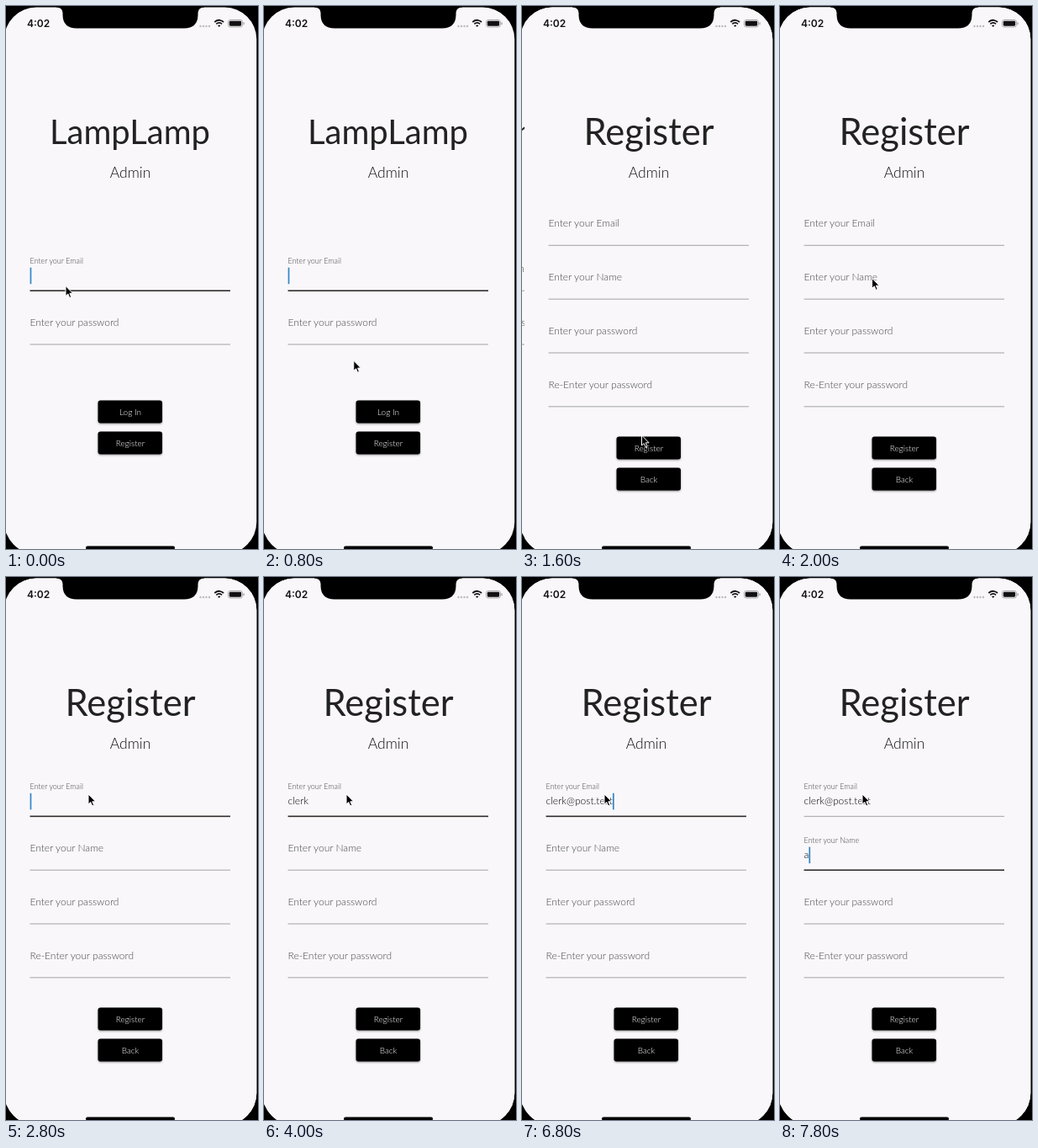
Animation of 300 by 645 pixels, one loop 8000 ms. Source, as an HTML page:

```html
<!DOCTYPE html>
<html lang="en">
<head>
<meta charset="utf-8">
<title>Register screen</title>
<style>
  html, body { margin: 0; width: 100%; height: 100%; overflow: hidden; background: #000; }
  svg { display: block; width: 100vw; height: 100vh; }
  text { font-family: Lato, "Open Sans", sans-serif; font-weight: 300; fill: #222; }
  .title, .subtitle { text-anchor: middle; }
  .title { font-weight: 400; }
  .subtitle { font-size: 17.5px; fill: #111; }
  .label { fill: #444; }
  .input { font-size: 12px; fill: #000; white-space: pre; }
  .paper { fill: #f9f7fa; }
  .button rect { filter: drop-shadow(0 1.5px 1.2px rgba(0, 0, 0, .4)); }
  .button.pressed rect { fill: #1a1a1a; filter: drop-shadow(0 4px 3.5px rgba(0, 0, 0, .45)); }
  .button text { font-size: 10px; fill: #fff; text-anchor: middle; }
  .clock { font: 600 12px Inter, sans-serif; fill: #111; }
</style>
</head>
<body>
<svg viewBox="0 0 300 645" preserveAspectRatio="none">
  <defs>
    <clipPath id="screen"><rect x="-2" y="1.5" width="300.3" height="649.5" rx="38"/></clipPath>
    <clipPath id="pressArea"><rect x="109.5" y="505.5" width="76.5" height="27" rx="3"/></clipPath>
  </defs>
  <rect width="300" height="645"/>
  <g clip-path="url(#screen)">
    <rect class="paper" width="300" height="645"/>
    <g id="login">
      <text class="title" x="147.5" y="164" font-size="40">LampLamp</text>
      <text class="subtitle" x="148" y="204">Admin</text>
    </g>
    <g id="register">
      <rect class="paper" width="300" height="645"/>
      <text class="title" x="148" y="164.5" font-size="43.5">Register</text>
      <text class="subtitle" x="148" y="204">Admin</text>
    </g>
    <rect x="95" y="641.5" width="106" height="4" rx="2"/>
  </g>
  <path d="M60 0V1.5Q67 1.5 67.5 8V11Q68 26.500 84 26.500H212Q228 26.500 228.500 11V8Q229 1.500 236 1.500V0Z"/>
  <text class="clock" x="25" y="25">4:02</text>
  <g fill="#bbb">
    <circle cx="231.5" cy="24" r="1.2"/><circle cx="235" cy="24" r="1.2"/>
    <circle cx="238.5" cy="24" r="1.2"/><circle cx="242" cy="24" r="1.2"/>
  </g>
  <g fill="none" stroke="#111" stroke-width="1.7">
    <path d="M248.3 19Q253.7 14.5 259.1 19M250.3 21.3Q253.7 18.5 257.1 21.3"/>
    <path d="M252 23L253.7 25L255.4 23Q253.7 21.8 252 23Z" fill="#111" stroke="none"/>
  </g>
  <rect x="264.5" y="16.5" width="17" height="8.5" rx="2.5" fill="none" stroke="#999" stroke-width=".8"/>
  <rect x="265.8" y="17.8" width="14.4" height="5.9" rx="1.4" fill="#111"/>
  <rect x="282.5" y="19.3" width="1.2" height="3" rx=".6" fill="#999"/>
  <path id="pointer" d="M0 0V12L2.8 9.5L4.7 14L6.7 13.1L4.8 8.8H8.6Z"
        stroke="#fff" stroke-width="1" stroke-linejoin="round"/>
</svg>
<script>
const STEP = 200, LOOP = 8000;
const $ = id => document.getElementById(id);
const login = $("login"), register = $("register"), pointer = $("pointer");

function add(parent, tag, attrs, text = "") {
  const el = document.createElementNS("http://www.w3.org/2000/svg", tag);
  for (const key in attrs) el.setAttribute(key, attrs[key]);
  el.textContent = text;
  return parent.appendChild(el);
}

// A text field placed by its underline; returns a function that sets its state.
function field(page, y, caption) {
  const label = add(page, "text", { class: "label", x: 28.5 }, caption);
  const input = add(page, "text", { class: "input", x: 28.5, y: y - 14.5 });
  const line = add(page, "rect", { x: 28.5, width: 238.5 });
  const caret = add(page, "rect", { y: y - 27.5, width: 1.7, height: 19.5, fill: "#2f86c8" });
  return ({ float = 0, focus = false, value = "", blink = false } = {}) => {
    label.setAttribute("font-size", 12 - 3 * float);
    label.setAttribute("y", y - 22 - 10.5 * float);
    input.textContent = value;
    line.setAttribute("y", y - (focus ? 0.8 : 0.5));
    line.setAttribute("height", focus ? 1.6 : 1);
    line.setAttribute("fill", focus ? "#332d2d" : "#a3a2a6");
    caret.setAttribute("x", 28.6 + (value ? input.getComputedTextLength() : 0));
    caret.setAttribute("visibility", focus && !blink ? "visible" : "hidden");
  };
}

function button(page, y, caption) {
  const g = add(page, "g", { class: "button" });
  add(g, "rect", { x: 109.5, y, width: 76.5, height: 27, rx: 3 });
  add(g, "text", { x: 148, y: y + 17 }, caption);
  return g;
}

const loginEmail = field(login, 338.2, "Enter your Email");
field(login, 402, "Enter your password")();
button(login, 468.5, "Log In");
const openRegister = button(login, 505.5, "Register");
const ripple = add(login, "circle", {
  cx: 143.5, cy: 510.5, r: 14.5, fill: "#fff", opacity: 0.24, "clip-path": "url(#pressArea)"
});

const rowY = i => 284.3 + 63.85 * i;
const email = field(register, rowY(0), "Enter your Email");
const name = field(register, rowY(1), "Enter your Name");
field(register, rowY(2), "Enter your password")();
field(register, rowY(3), "Re-Enter your password")();
button(register, 511.5, "Register");
button(register, 548.5, "Back");

const ADDRESS = "clerk@post.test";
const KEY_STEPS = [15, 16, 17, 18, 18, 22, 23, 24, 25, 26, 27, 29, 32, 33, 34];

const ease = (s, from, to) => {
  const p = Math.min(1, Math.max(0, (s - from) / (to - from)));
  return p * p * (3 - 2 * p);
};
const move = (el, x, y = 0) => el.setAttribute("transform", `translate(${x} ${y})`);

function draw(now) {
  const s = Math.floor(now % LOOP / STEP);   // the screen refreshes five times a second
  const onLogin = s < 8, slide = s === 8 ? 3 : 0;

  const down = ease(s, 2, 6), up = ease(s, 8, 11);
  move(pointer, 71 + 71.5 * down - 44.5 * up, 332.5 + 177.5 * down - 252 * up);

  login.setAttribute("visibility", s < 9 ? "visible" : "hidden");
  register.setAttribute("display", onLogin ? "none" : "inline");
  move(login, onLogin ? 0 : -99);
  move(register, slide);

  loginEmail({ float: +onLogin, focus: onLogin, blink: s % 4 > 1 });
  openRegister.classList.toggle("pressed", s === 7);
  ripple.setAttribute("display", s === 7 ? "inline" : "none");

  email({
    float: ease(s, 10, 12),
    focus: s > 10 && s < 35,
    value: ADDRESS.slice(0, KEY_STEPS.filter(k => k <= s).length),
    blink: s === 12 || s === 13 || s === 20
  });
  name({ float: ease(s, 34, 36), focus: s > 34, value: s > 37 ? "a" : "" });
}

const start = performance.now();
function tick() {
  draw(performance.now() - start);
  requestAnimationFrame(tick);
}
tick();
</script>
</body>
</html>
```
